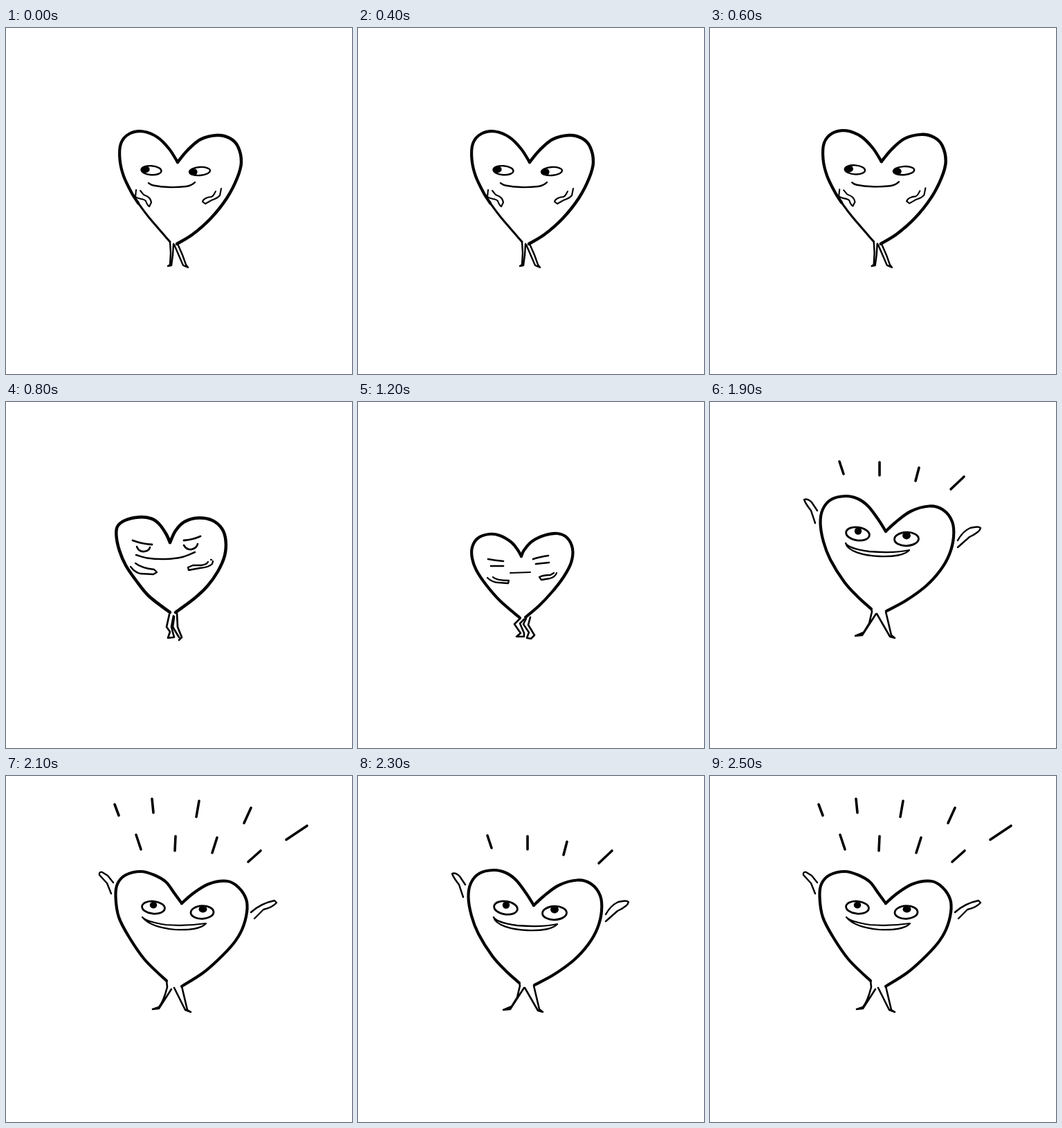
Write an HTML page that moves like this. It is 500 px wide and 500 px high and loops after 2.7 s.

```html
<!DOCTYPE html>
<html lang="en">
<head>
<meta charset="utf-8">
<title>Heart jump</title>
<style>
  html, body { margin: 0; width: 100%; height: 100%; overflow: hidden; background: #fff; }
  svg { display: block; width: 100%; height: 100%; }
  path, ellipse { stroke: #000; fill: none; stroke-linecap: round; stroke-linejoin: round; }
</style>
</head>
<body>
<svg id="stage" viewBox="0 0 500 500"></svg>
<script>
const stage = document.getElementById('stage');

function add(parent, tag, attrs) {
  const el = document.createElementNS('http://www.w3.org/2000/svg', tag);
  for (const key in attrs) el.setAttribute(key, attrs[key]);
  return parent.appendChild(el);
}

// Smooth curve through points written as "x,y x,y ..."
function spline(text) {
  const pts = text.split(' ').map(p => p.split(',').map(Number));
  let d = 'M' + pts[0];
  for (let i = 0; i < pts.length - 1; i++) {
    const a = pts[Math.max(i - 1, 0)], b = pts[i], c = pts[i + 1];
    const e = pts[Math.min(i + 2, pts.length - 1)];
    const c1 = b.map((v, k) => v + (c[k] - a[k]) / 6);
    const c2 = c.map((v, k) => v - (e[k] - b[k]) / 6);
    d += `C${c1} ${c2} ${c}`;
  }
  return d;
}

const curve = (width, text) => ['path', { d: spline(text), 'stroke-width': width }];
const line = (width, d) => ['path', { d, 'stroke-width': width }];
const oval = (x, y, rx, ry, tilt = 0, width = 2.8) => ['ellipse', {
  cx: x, cy: y, rx, ry, 'stroke-width': width, transform: `rotate(${tilt} ${x} ${y})`
}];
const dot = (x, y, rx, ry) => ['ellipse', { cx: x, cy: y, rx, ry, style: 'fill:#000;stroke:none' }];

const idle = [
  curve(4.2, '248,194 236,175 219,158 198,149.5 178,153 166,167 164.5,190 170,214 182,239 191,253'),
  curve(3, '191,253 206,273 237,309'),
  curve(4.4, '248,194 262,177 281,161 305,155 323,159 335,171 340,194 334,217 319,246 296,275 270,298 247,312'),
  oval(210, 205.7, 14.5, 6.5, 4, 2.4), dot(202, 204.3, 5.6, 5),
  oval(280, 207, 15, 6, -4, 2.4), dot(271, 208, 5.6, 5.2),
  curve(2.4, '206,224 213,227.5 236,230 260,229 268,226.5 273,223'),
  line(2.1, 'M188,234L187,244C192,248 199,246 202,250Q204,256 207,258L210,252C209,245 204,243 199,241L194,235'),
  line(2.1, 'M311,232L309,242C304,248 299,247 295,250L288,254L284,251C285,247 291,244 297,244C301,242 301,239 303,236'),
  line(2.4, 'M237,309L238,325L237,342L234,344L239,343L241,328L242,312'),
  line(2.4, 'M243,313L256,343L263,346L260,342L255,328L248,312')
];

const sinking = [
  curve(4.5, '237,203 231,190 221,176 210,168.5 192,166.5 172,171 161,180 159.5,194 164,215 173,236 188,258 207,281 237,304'),
  curve(4.5, '237,203 245,186 258,173 278,167.5 298,171 312,183 317.5,200 316,222 306,245 291,266 272,284 245,304'),
  line(2.8, 'M183,200Q196,205 211,206M257,200Q270,199 281,194'),
  line(2.6, 'M189,209Q192,217 200,216Q207,215 208,210M257,207Q261,214 268,213Q276,211 277,205'),
  curve(2.5, '188,221 204,225.5 230,227 255,224 273,217'),
  line(2.3, 'M180,238Q186,246 194,248L213,249L218,246L214,242Q196,240 187,233'),
  line(2.3, 'M292,231Q290,235 282,236L270,236L263,239L264,243L280,240Q293,239 298,234L299,230M296,228L297,228'),
  line(2.7, 'M236,307L232,325L237,332L234,341L243,340L239,325L242,309'),
  line(2.7, 'M243,310L241,325L250,340M247,305L248,325L254,340L250,344')
];

const crouch = [
  curve(4.2, '236,223 231,214 222,203 205,193 189,191 173,197 165,210 165,226 171,243 185,264 205,287 234,312'),
  curve(4.2, '236,223 240,214 252,201 270,192.5 288,190 302,196 310,212 308,232 297,253 280,275 261,295 242,311'),
  line(2.7, 'M188,227Q198,229 210,230M192,237L210,237M253,227Q262,224 275,222M257,234L276,232'),
  line(2, 'M220,247L249,246'),
  line(2.3, 'M187,254Q194,261 204,261L217,262L218,258Q200,258 195,253'),
  line(2.3, 'M287,247Q285,253 277,255L265,257L262,253Q268,250 278,250L283,247'),
  line(2.6, 'M234,313L226,321L235,334L229,339L240,339L240,334L234,320L240,314'),
  line(2.6, 'M243,313L239,321L247,333L244,341L250,342L255,337L246,322L249,311')
];

const cheer = [
  curve(4.2, '254,187 244,171 229,151 214,140 196,136 175,141 163,155 159.5,175 164,202 174,228 194,260 213,281 233,299'),
  curve(4.2, '254,187 268,174 290,158 317,150.5 337,156 350,173 352,195 346,220 333,243 312,266 283,287 255,302'),
  oval(213.5, 190.5, 17, 9.5, 8), dot(214, 186.5, 5.2, 5.2),
  oval(284, 198, 17.5, 9.8, -2), dot(284, 193, 6, 5.4),
  line(2.3, 'M196,204C198,208 208,213 230,216C255,218 275,217 288,214C282,221 265,224 245,223C222,222 199,216 196,204Z'),
  line(2.4, 'M152,175L146,157Q138,147 136,141Q141,139 147,145L155,157'),
  line(2.4, 'M358,200Q365,187 376,182Q388,179 391,182Q390,188 375,195L358,210'),
  line(2.6, 'M233,299L234,303L230,320L222,333L210,338L220,337L240,306'),
  line(2.6, 'M241,306L260,339L267,341L262,337L254,303'),
  line(3.6, 'M187,86L193,104M245,87L245,106M302,95L297,114M367,108L348,126')
];

const shine = [
  curve(4.2, '254,184 243,169 231,153 214,143 195,138 173,143 161,156 158.5,175 163,204 178,233 201,266 232,296'),
  curve(4.2, '254,184 270,170 293,156 320,152 336,161 347,178 348,197 341,222 328,243 305,267 284,285 254,304'),
  oval(213, 190, 16.5, 9, 6), dot(213, 186.5, 5.2, 5),
  oval(283.5, 197, 16.5, 9.3, -2), dot(284.5, 192.5, 6, 5),
  line(2.2, 'M197,204C202,209 211,212 231,215C255,217 275,215 289,213C283,220 266,223 245,222C222,220 206,215 197,204Z'),
  line(2.4, 'M152,170L146,155L135,143Q134,138 139,139L147,144L155,154'),
  line(2.4, 'M354,197Q368,184 388,180L391,183Q385,190 372,193L359,206'),
  line(2.6, 'M232,296L233,305Q228,325 221,334L212,337L221,336L239,308'),
  line(2.6, 'M243,306L259,338L267,341L262,338L254,304'),
  line(3.6, 'M188,85L195,106M245,87L244,108M305,89L298,111M368,108L350,124'),
  line(3.6, 'M157,41L163,57M211,33L213,53M279,36L275,59M354,46L344,68M435,72L405,92')
];

// Slight redraw wobble: scale about a fixed point
const wobble = (x, y, sx, sy) => `translate(${x} ${y}) scale(${sx} ${sy}) translate(${-x} ${-y})`;

function pose(strokes, transform = '') {
  const group = add(stage, 'g', { transform, display: 'none' });
  for (const [tag, attrs] of strokes) add(group, tag, attrs);
  return group;
}

const rest = pose(idle);
const up = pose(cheer), rays = pose(shine);
const steps = [
  [0, rest],
  [200, pose(idle, wobble(164, 346, 1.006, 1.006))],
  [400, rest],
  [600, pose(idle, wobble(270, 346, 1.01, 1.006))],
  [800, pose(sinking)],
  [1000, pose(sinking, 'translate(-2 0) ' + wobble(238, 164, 1, 0.987))],
  [1200, pose(crouch)],
  [1700, pose(crouch, wobble(238, 341, 1.008, 1.006))],
  [1900, up],
  [2100, rays],
  [2300, up],
  [2500, rays]
];

const LOOP = 2700;
const start = performance.now();
let shown = null;

function draw() {
  const t = (performance.now() - start) % LOOP;
  const next = steps.filter(step => step[0] <= t).pop()[1];
  if (next !== shown) {
    if (shown) shown.setAttribute('display', 'none');
    next.removeAttribute('display');
    shown = next;
  }
  requestAnimationFrame(draw);
}
draw();
</script>
</body>
</html>
```
